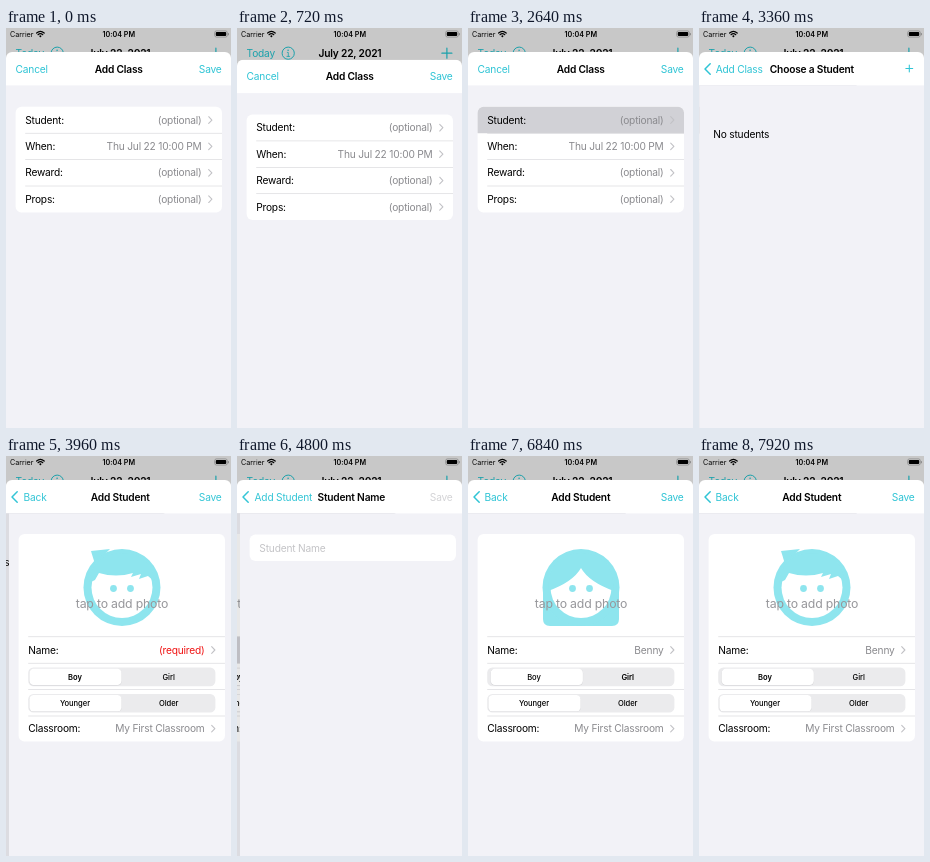
An HTML page for the animation above (8 s loop, 225x400 px).

```html
<!DOCTYPE html>
<html lang="en">
<head>
<meta charset="utf-8">
<title>Add a student</title>
<style>
html, body { margin: 0; width: 100%; height: 100%; overflow: hidden; background: #c8c8c8; }
svg { display: block; width: 100vw; height: 100vh; }
text { font: 400 10.2px Inter, "Open Sans", sans-serif; letter-spacing: -.2px; white-space: pre; }
.bold { font-weight: 600; }
.status { font-size: 7.2px; letter-spacing: 0; }
.segment { font-size: 7.6px; letter-spacing: -.05px; font-weight: 500; }
.photo { font-size: 12.3px; }
.plus { font-size: 17px; font-weight: 300; }
.line { fill: none; stroke-linecap: round; stroke-linejoin: round; }
</style>
</head>
<body>
<svg id="stage" viewBox="0 0 225 400"></svg>
<script>
const LOOP = 8000, WIDTH = 225, HEADER_END = 57.4, PARALLAX = 67.5;
const TINT = '#2fc4d5', DIM_TINT = '#1ba1ab', FACE = '#8ee5ee', GRAY = '#8a8a8e';
const NAME = 'Benny';

const text = (x, y, label, { fill = '#000', anchor = 'start', cls = '', id = '' } = {}) =>
  `<text x="${x}" y="${y}" fill="${fill}" text-anchor="${anchor}" class="${cls}" id="${id}">${label}</text>`;
const rect = (x, y, w, h, fill, r = 0, more = '') =>
  `<rect x="${x}" y="${y}" width="${w}" height="${h}" rx="${r}" fill="${fill}" ${more}/>`;
const line = (d, stroke, width = 1) =>
  `<path class="line" d="${d}" stroke="${stroke}" stroke-width="${width}"/>`;
const circle = (x, y, r, fill = FACE) => `<circle cx="${x}" cy="${y}" r="${r}" fill="${fill}"/>`;

const card = (y, h) => rect(9.6, y, 206.4, h, '#fff', 6);
const separator = y => rect(19.2, y - .3, 196.8, .6, '#d4d4d8');
const disclosure = y => line(`M202.7 ${y - 3.3}l3.2 3.3l-3.2 3.3`, '#c2c2c6', 1.1);
const row = (y, label, value, options = {}) =>
  text(19.2, y + 3.6, label) +
  text(195.6, y + 3.6, value, { fill: GRAY, anchor: 'end', ...options }) + disclosure(y);

const segments = (y, left, right, key) =>
  rect(19.2, y, 187.2, 18.6, '#ebebed', 5.2) +
  `<g id="${key}Pill">${rect(20.2, y + 1.3, 92.6, 16.6, '#d2d2d5', 4.4)}` +
  `${rect(20.4, y + 1.1, 92.2, 16.3, '#fff', 4.2)}</g>` +
  text(66, y + 11.9, left, { anchor: 'middle', cls: 'segment bold', id: key + 'Left' }) +
  text(159.7, y + 11.9, right, { anchor: 'middle', cls: 'segment', id: key + 'Right' });

// Both faces share a ring and eyes; only the hair differs.
const face = (id, outline, hair) =>
  `<g id="${id}" fill="${FACE}"><path d="${outline}"/>${circle(113, 131.5, 38.5)}` +
  `${circle(113, 131.5, 30.5, '#fff')}<path d="${hair}"/>` +
  `${circle(104.5, 132.5, 3.4)}${circle(121.5, 132.5, 3.4)}</g>`;
const boy = face('boy', 'M82 95L101 93L86 108Z',
  'M80 127L86 124L90 117Q107 122 124 117L122 121L132 118L130 123L139 120L146 126Q143 97 113 97Q83 97 80 127Z');
const girl = face('girl', 'M75 130H151V163Q151 170 144 170H82Q75 170 75 163Z',
  'M80 135Q105 126 113 112Q121 126 146 135Q146 97 113 97Q80 97 80 135Z');

const screens = [
  { title: 'Add Class', back: 'Cancel', right: 'Save', root: true, body:
    card(78.8, 105.6) + `<path id="studentRow" d="M9.6 105.2V84.8a6 6 0 0 1 6-6H210a6 6 0 0 1 6 6v20.4z" fill="#d1d1d6"/>` +
    [105.2, 131.6, 158].map(separator).join('') +
    row(92, 'Student:', '(optional)') + row(118.4, 'When:', 'Thu Jul 22 10:00 PM') +
    row(144.8, 'Reward:', '(optional)') + row(171.2, 'Props:', '(optional)') },
  { title: 'Choose a Student', back: 'Add Class', right: '+', rightClass: 'plus', body:
    text(70, 109.6, 'No students', { anchor: 'end' }) },
  { title: 'Add Student', back: 'Back', right: 'Save', body:
    card(78, 207.6) + rect(9.6, 180.8, 206.4, 26.4, '#d1d1d6', 0, 'id="nameRow"') +
    [180.8, 207.2, 233.6, 260].map(separator).join('') + boy + girl +
    text(113, 152.3, 'tap to add photo', { fill: '#98989c', anchor: 'middle', cls: 'photo' }) +
    row(194, 'Name:', '(required)', { id: 'nameValue' }) +
    segments(211.6, 'Boy', 'Girl', 'kind') + segments(238, 'Younger', 'Older', 'age') +
    row(272.6, 'Classroom:', 'My First Classroom') },
  { title: 'Student Name', back: 'Add Student', right: 'Save', body:
    card(78.4, 26.6) + text(19.4, 95.5, '', { id: 'field' }) }
];

const pageMarkup = (s, i) =>
  `<g id="page${i}">${rect(0, HEADER_END, WIDTH, 360, '#f2f2f7')}${s.body}` +
  `${rect(0, HEADER_END, WIDTH, 360, '#000', 0, `id="shade${i}"`)}</g>`;
const headerMarkup = (s, i) =>
  text(112.8, 44.7, s.title, { anchor: 'middle', cls: 'bold', id: 'title' + i }) +
  `<g id="back${i}">${text(s.root ? 9.6 : 16.6, 44.7, s.back, { fill: TINT })}</g>` +
  `<g id="arrow${i}">${s.root ? '' : line('M11.2 35.8l-5.2 5.2l5.2 5.2', TINT, 1.5)}</g>` +
  text(215.6, 44.7, s.right, { fill: TINT, anchor: 'end', cls: s.rightClass, id: 'action' + i });

const stage = document.getElementById('stage');
stage.innerHTML =
  `<clipPath id="sheetShape">${rect(0, 24, WIDTH, 420, '#fff', 6)}</clipPath>` +
  rect(0, 0, WIDTH, 400, '#c8c8c8') +
  text(4, 8.7, 'Carrier', { cls: 'status' }) +
  text(112.8, 8.7, '10:04 PM', { cls: 'status bold', anchor: 'middle' }) +
  line('M30.6 5Q34.4 1.6 38.2 5M32 6.7Q34.4 4.5 36.8 6.7', '#000', 1.2) + circle(34.4, 8.2, 1, '#000') +
  rect(208.7, 2.9, 12.6, 6.2, 'none', 1.8, 'stroke="#777" stroke-width=".6"') +
  rect(209.8, 4, 10.4, 4, '#000', .9) + rect(222, 5, .7, 2.2, '#777', .3) +
  text(9.6, 28.8, 'Today', { fill: DIM_TINT }) +
  `<circle cx="51.2" cy="25.2" r="6.1" fill="none" stroke="${DIM_TINT}"/>` +
  line('M50.3 24.4h1v4M49.9 28.4h2.8', DIM_TINT, .8) + circle(51.1, 22.2, .8, DIM_TINT) +
  text(113, 28.8, 'July 22, 2021', { anchor: 'middle', cls: 'bold' }) +
  line('M204.9 25.2h10M209.9 20.2v10', DIM_TINT, 1.2) +
  `<g id="sheet"><g clip-path="url(#sheetShape)">${rect(0, 24, WIDTH, 420, '#fff')}` +
  screens.map(pageMarkup).join('') + screens.map(headerMarkup).join('') + '</g></g>';

const el = Object.fromEntries([...stage.querySelectorAll('[id]')].map(e => [e.id, e]));
const move = (id, x, y = 0) => el[id].setAttribute('transform', `translate(${x.toFixed(2)} ${y.toFixed(2)})`);
const fade = (id, opacity) => el[id].setAttribute('opacity', Math.max(0, Math.min(1, opacity)).toFixed(3));

// Critically damped spring from 0 to 1.
function spring(t, start, rate = 15) {
  const k = Math.max(0, t - start) / 1000 * rate;
  return k > 10 ? 1 : 1 - (1 + k) * Math.exp(-k);
}

// [time, vertical offset] of the dragged sheet.
const DRAG = [[0, 0], [840, 9], [1440, 14], [1680, 14.3], [1920, 5], [2100, -3], [2400, 0], [LOOP, 0]];
function sheetOffset(t) {
  const i = DRAG.findIndex(([time]) => time > t);
  const [t0, y0] = DRAG[i - 1], [t1, y1] = DRAG[i];
  return y0 + (y1 - y0) * (t - t0) / (t1 - t0);
}

function drawNavigation(t) {
  const shown = [1, spring(t, 2750), spring(t, 3540), spring(t, 4380) * (1 - spring(t, 6110)), 0];
  screens.forEach((s, i) => {
    const enter = shown[i], cover = shown[i + 1], visible = enter * (1 - cover);
    move('page' + i, WIDTH * (1 - enter) - PARALLAX * cover);
    fade('page' + i, enter > 0 ? 1 : 0);
    fade('shade' + i, .09 * cover);
    move('title' + i, 112 * (1 - enter) - 70 * cover);
    move('back' + i, 70 * (1 - enter) - 50 * cover);
    // Squaring hides the outgoing labels before they cross the new ones.
    for (const part of ['title', 'back', 'arrow', 'action']) fade(part + i, visible * visible);
  });
}

function drawForm(t) {
  const typed = NAME.slice(0, Math.max(0, Math.floor((t - 5160) / 120)));
  el.field.textContent = typed || 'Student Name';
  el.field.setAttribute('fill', typed ? '#000' : '#c4c4c7');
  el.action3.setAttribute('fill', typed && t < 5880 ? TINT : t < 6000 ? '#d2d2d5' : '#e4e4e6');
  fade('studentRow', t >= 2640 && t < 3500 ? 1 : 0);
  fade('nameRow', t >= 4320 && t < 6000 ? 1 : 0);

  const saved = t >= 6000;
  el.nameValue.textContent = saved ? NAME : '(required)';
  el.nameValue.setAttribute('fill', saved ? GRAY : '#f01414');

  const girlSide = spring(t, 6825) * (1 - spring(t, 7640, 20));
  const isGirl = t >= 6840 && t < 7680;
  move('kindPill', 92.6 * girlSide);
  el.kindLeft.style.fontWeight = isGirl ? 500 : 600;
  el.kindRight.style.fontWeight = isGirl ? 600 : 500;
  fade('boy', isGirl ? 0 : 1);
  fade('girl', isGirl ? 1 : 0);
}

const begin = performance.now();
function draw() {
  const t = (performance.now() - begin) % LOOP;
  move('sheet', 0, sheetOffset(t));
  drawNavigation(t);
  drawForm(t);
  requestAnimationFrame(draw);
}
draw();
</script>
</body>
</html>
```
